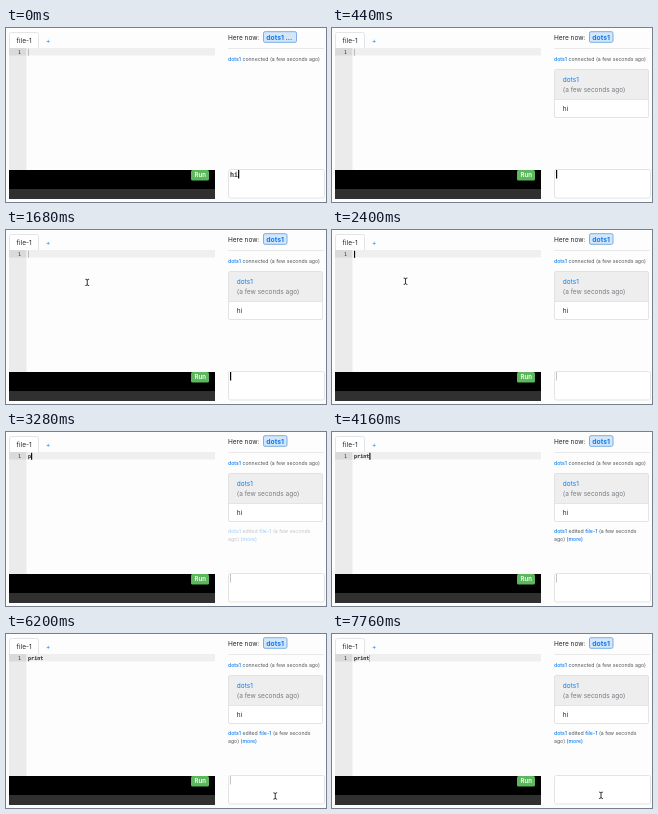
An HTML page for the animation above (8 s loop, 320 by 174 pixels).

```html
<!DOCTYPE html>
<html lang="en">
<head>
<meta charset="utf-8">
<title>Shared editor with chat</title>
<style>
  html, body { margin: 0; width: 100%; height: 100%; overflow: hidden; background: #fdfdfd; }
  svg { display: block; width: 100vw; height: 100vh; }
  text { font: 6.5px Inter, "Open Sans", sans-serif; fill: #212529; white-space: pre; }
  .small { font-size: 5.2px; fill: #50565b; }
  .muted { fill: #777d82; }
  .link { fill: #0a7cf5; }
  .small .link { font-weight: 500; }
  .bold { font-weight: 700; font-size: 6.8px; }
  .mono { font-family: "DejaVu Sans Mono", monospace; font-size: 5.1px; }
  .code { stroke: #212529; stroke-width: .2px; }
  .input { font-size: 6.7px; }
</style>
</head>
<body>
<svg viewBox="0 0 320 174" preserveAspectRatio="none">
  <!-- editor -->
  <path d="M3 20.5H209" stroke="#dee2e6"/>
  <path d="M3.5 20V6.5q0-2 2-2H30.5q2 0 2 2V20" fill="#fff" stroke="#dee2e6" stroke-width=".9"/>
  <text x="10.6" y="15">file-1</text>
  <text x="40" y="15" class="link">+</text>
  <rect x="3" y="20" width="17.5" height="122" fill="#ebebeb"/>
  <rect x="3" y="20" width="17.5" height="7.5" fill="#dadada"/>
  <rect x="20.5" y="20" width="188.5" height="7.5" fill="#efefef"/>
  <text x="12" y="25.8" class="mono" style="fill:#333">1</text>
  <text id="code" x="22" y="25.8" class="mono code"></text>
  <rect id="codeCaret" y="20.8" height="7"/>

  <!-- console -->
  <rect x="3" y="142" width="206" height="19"/>
  <rect x="3" y="161" width="206" height="10" fill="#303030"/>
  <rect x="185" y="142" width="18" height="10.5" rx="1.5" fill="#5cb85c"/>
  <text x="194.2" y="149.4" text-anchor="middle" style="fill:#fff;font-size:6px;font-weight:600">Run</text>

  <!-- people -->
  <text x="222" y="11.7">Here now:</text>
  <rect id="badge" x="257.5" y="3.7" height="10.6" rx="1.5" fill="#d5e6f8" stroke="#6ba7e4" stroke-width=".9"/>
  <text id="badgeText" x="260.3" y="11.6" class="bold link"></text>
  <path d="M222 20.5H318" stroke="#e9e9e9"/>

  <!-- feed -->
  <text x="222" y="33" class="small"><tspan class="link">dots1</tspan> connected (a few seconds ago)</text>
  <g id="card">
    <rect x="222.5" y="41.5" width="94" height="48" rx="1.5" fill="#fff"/>
    <rect x="222.5" y="41.5" width="94" height="30" rx="1.5" fill="#eee"/>
    <path d="M222.5 71.5H316.5" stroke="#e0e0e0" stroke-width=".8"/>
    <rect x="222.5" y="41.5" width="94" height="48" rx="1.5" fill="none" stroke="#dedede" stroke-width=".8"/>
    <text x="230.8" y="54" class="link">dots1</text>
    <text x="230.8" y="64" class="muted">(a few seconds ago)</text>
    <text x="230.8" y="82.8">hi</text>
  </g>
  <g id="edit">
    <text x="222" y="101.3" class="small"><tspan class="link">dots1</tspan> edited <tspan class="link">file-1</tspan> (a few seconds</text>
    <text x="222" y="109.1" class="small">ago) <tspan class="link">(more)</tspan></text>
  </g>

  <!-- message box -->
  <rect x="222.5" y="141.5" width="96" height="28.5" rx="2" fill="#fff" stroke="#dcdee0" stroke-width=".8"/>
  <text id="draft" x="224" y="149" class="mono input code"></text>
  <rect id="draftCaret" y="142" height="8.5"/>

  <!-- pointer -->
  <g id="beam" fill="none" stroke-linecap="round">
    <use href="#beamShape" stroke="#fff" stroke-width="1.8"/>
    <use href="#beamShape" stroke="#222" stroke-width=".9"/>
  </g>
  <path id="arrow" d="M0-3V3.8L1.6 2.4 2.7 4.8 3.8 4.3 2.7 2H4.8Z" fill="#111" stroke="#fff" stroke-width=".5"/>
  <defs>
    <path id="beamShape" d="M-1.5-3.2Q0-3.2 0-2.2Q0-3.2 1.5-3.2M0-2.2V2.2M-1.5 3.2Q0 3.2 0 2.2Q0 3.2 1.5 3.2"/>
  </defs>
</svg>
<script>
const LOOP = 8000, STEP = 40;
const $ = id => document.getElementById(id);
const set = (id, attrs) => {
  for (const k in attrs) $(id).setAttribute(k, attrs[k]);
};
const show = (id, on) => set(id, { display: on ? "inline" : "none" });
const clamp = v => Math.max(0, Math.min(1, v));
const ramp = (t, a, b) => clamp((t - a) / (b - a));
const out = (u, power) => 1 - Math.pow(1 - u, power);
const mix = (a, b, u) => a + (b - a) * u;

const keyTimes = [3120, 3400, 3640, 3920, 4160];

function pointerAt(t) {
  if (t >= 1120 && t < 3120) {
    const u = ramp(t, 1120, 1920);
    return [mix(251, 73.5, out(u, 2.6)), mix(151, 51.2, out(u, 3.67))];
  }
  if (t >= 4960 && t < 5240) {
    const u = ramp(t, 4960, 5240);
    return [mix(79, 237, u), mix(53.5, 180, u)];
  }
  if (t >= 5880) {
    const u = out(ramp(t, 5880, 6280), 2);
    return [mix(275, 269, u), mix(178, 161.3, u)];
  }
  return null;
}

function drawPointer(t) {
  const p = pointerAt(t);
  const inEditor = p && p[0] < 209 && p[1] < 142;
  const inDraft = p && p[0] > 222 && p[1] > 141 && p[1] < 170;
  const beam = inEditor || inDraft;
  show("beam", p && beam);
  show("arrow", p && !beam);
  if (p) set(beam ? "beam" : "arrow", { transform: `translate(${p[0]} ${p[1]})` });
}

function drawCarets(t, typed, draft) {
  const editing = t >= 2040 && t < 6280;
  const blinkOff = t >= 5600 && t < 6280;
  show("codeCaret", !blinkOff);
  set("codeCaret", {
    x: 22 + typed * 3.07,
    width: editing ? 1.1 : 0.6,
    fill: editing ? "#000" : "#999"
  });
  show("draftCaret", t < 7760);
  set("draftCaret", {
    x: 224 + draft.length * 4.03,
    width: editing ? 0.7 : 1.2,
    fill: editing ? "#aaa" : "#000"
  });
}

function draw(t) {
  const typed = keyTimes.filter(k => t >= k).length;
  const draft = t < 80 ? "hi" : "";
  const typing = t < 120;

  $("code").textContent = "print".slice(0, typed);
  $("draft").textContent = draft;
  $("badgeText").textContent = typing ? "dots1 ..." : "dots1";
  set("badge", { width: typing ? 33 : 23.5 });
  set("card", { opacity: ramp(t, 80, 400) });
  set("edit", { opacity: ramp(t, 3200, 3440) });
  drawCarets(t, typed, draft);
  drawPointer(t);
}

function frame() {
  const t = performance.now() % LOOP;
  draw(t - t % STEP);
  requestAnimationFrame(frame);
}
frame();
</script>
</body>
</html>
```
